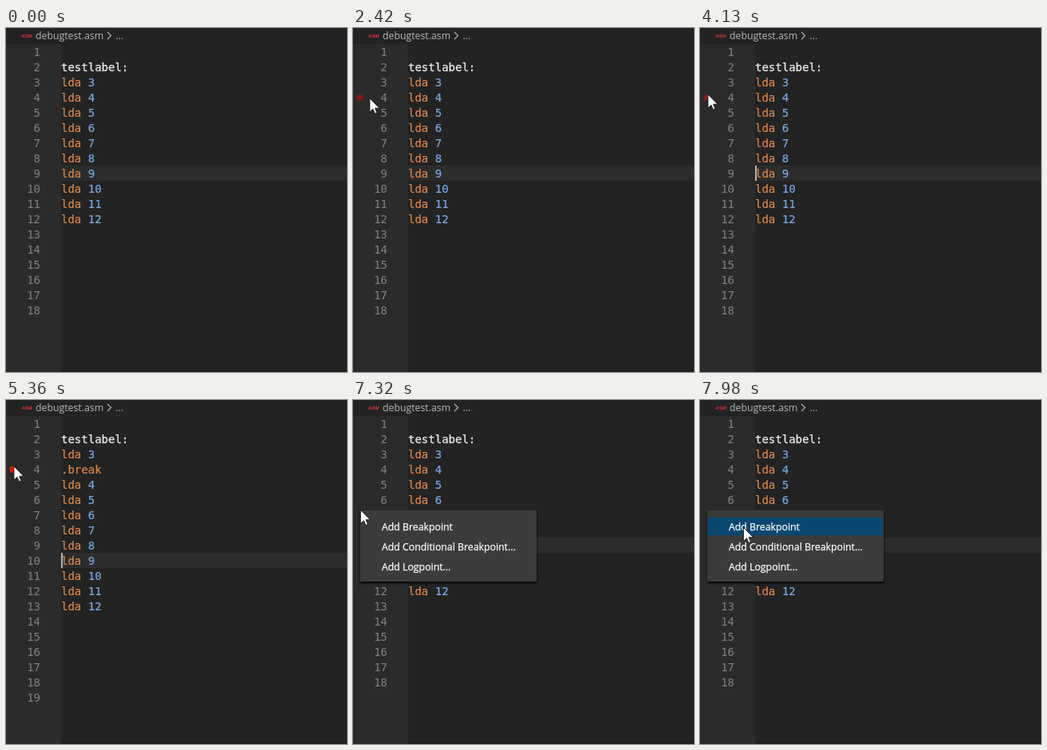
An HTML page that plays this animation: 427x430 px, repeating every 8 s.

```html
<!DOCTYPE html>
<html lang="en">
<head>
<meta charset="utf-8">
<title>Editor breakpoints</title>
<style>
  html, body { margin: 0; width: 100%; height: 100%; overflow: hidden; background: #232323; }
  svg { display: block; }
  text { white-space: pre; }
  .code { font: 14px "DejaVu Sans Mono", monospace; }
  .ui { font: 12.3px "Open Sans", sans-serif; }
  .path { fill: #b8b8b8; }
  .item { fill: #fff; stroke: #fff; stroke-width: .25; }
  .number { fill: #818181; text-anchor: end; }
  .label { fill: #ececec; stroke: #ececec; stroke-width: .25; }
  .op { fill: #db884a; stroke: #db884a; stroke-width: .2; }
  .value { fill: #78a7e2; stroke: #78a7e2; stroke-width: .2; }
</style>
</head>
<body>
<svg width="427" height="430" viewBox="0 0 427 430">
  <defs>
    <filter id="shadow" x="-10%" y="-15%" width="120%" height="135%">
      <feDropShadow dx="0" dy="2" stdDeviation="1.6" flood-color="#000"/>
    </filter>
  </defs>
  <rect width="427" height="430" fill="#232323"/>
  <rect y="20" width="69" height="410" fill="#2b2b2b"/>
  <rect x="69" y="427" width="358" height="3" fill="#1e1e1e"/>
  <rect id="activeLine" x="69" width="358" height="19" fill="#2c2c2c"/>

  <text x="19" y="11.5" fill="#d8343b" font-family="Liberation Sans, sans-serif" font-size="6.2" font-weight="700" font-style="italic">ASM</text>
  <text class="ui path" x="37" y="14">debugtest.asm</text>
  <path d="M127 5l4.5 4.5l-4.5 4.5" fill="none" stroke="#b8b8b8" stroke-width="1.1"/>
  <text class="ui path" x="137.5" y="14">...</text>

  <g id="plain" class="code"></g>
  <g id="marked" class="code"></g>
  <rect id="caret" x="69" width="2" height="19" fill="#b4b4b4"/>
  <circle id="dot" cx="8.5" r="4"/>

  <g id="menu">
    <rect x="9" y="138" width="221" height="89" fill="#3b3b3b" filter="url(#shadow)"/>
    <rect id="hover" x="10" y="147" width="219" height="22" fill="#094771"/>
    <g class="ui item">
      <text x="36" y="163">Add Breakpoint</text>
      <text x="36" y="188">Add Conditional Breakpoint...</text>
      <text x="36" y="213">Add Logpoint...</text>
    </g>
  </g>

  <path id="arrow" d="M0 0V17L4 13.3L6.5 19L9 18L6.6 12.2H12Z" fill="#fff" stroke="#111" stroke-width=".8"/>
  <g id="beam" fill="none">
    <path d="M-3.5 -7.5H3.5M0 -7.5V7.5M-3.5 7.5H3.5" stroke="#111" stroke-width="2.6"/>
    <path d="M-3.5 -7.5H3.5M0 -7.5V7.5M-3.5 7.5H3.5" stroke="#eee" stroke-width="1.2"/>
  </g>
</svg>
<script>
const LOOP = 8000, ROW = 19, TOP = 20, GUTTER = 69, BLINK = 495;
const HOVER_START = 1930, MENU_OPEN = 7320;
const el = id => document.getElementById(id);
const rowTop = row => TOP + ROW * (row - 1);
const rowAt = y => Math.floor((y - TOP) / ROW) + 1;
const show = (node, on) => { node.style.display = on ? '' : 'none'; };
const place = (node, p) => node.setAttribute('transform', `translate(${p.x} ${p.y})`);

const span = (type, text) => `<tspan class="${type}">${text}</tspan>`;
const program = ['', span('label', 'testlabel:')];
for (let n = 3; n <= 12; n++) program.push(span('op', 'lda ') + span('value', n));
const withBreak = program.slice();
withBreak.splice(3, 0, span('op', '.break'));

function listing(lines, count) {
  let out = '';
  for (let row = 1; row <= count; row++) {
    const y = rowTop(row) + 15;
    out += `<text class="number" x="43" y="${y}">${row}</text>`;
    if (lines[row - 1]) out += `<text x="${GUTTER}" y="${y}">${lines[row - 1]}</text>`;
  }
  return out;
}
el('plain').innerHTML = listing(program, 18);
el('marked').innerHTML = listing(withBreak, 19);

// Each click toggles the breakpoint and restarts the caret blink.
const clicks = [3180, 4130, 4870, 5480];

const moves = [
  { start: 930, end: 1690, steps: 13, from: [401, 341], to: [50, 109], ease: 1.42 },
  { start: 1750, end: 1930, steps: 3, from: [43, 104], to: [27, 92], ease: 1 },
  { start: 2420, end: 2720, steps: 4, from: [21, 88], to: [10, 83], ease: 1 },
  { start: 6230, end: 6590, steps: 6, from: [3, 90], to: [9.5, 137.5], ease: 1.65 },
  { start: 7810, end: 7980, steps: 3, from: [18, 141], to: [54.5, 159.5], ease: 1 }
];

function pointerAt(t) {
  const move = moves.filter(m => m.start <= t).pop();
  if (!move) return null;
  const { start, end, steps, from, to, ease } = move;
  const raw = Math.min(1, (t - start) / (end - start));
  const p = Math.floor(raw * steps + 0.05) / steps;
  const k = 1 - (1 - p) ** ease;
  const mix = i => Math.round(2 * (from[i] + (to[i] - from[i]) * k)) / 2;
  return { x: mix(0), y: mix(1) };
}

function render(t) {
  const done = clicks.filter(c => c <= t);
  const marked = done.length % 2 === 1;
  show(el('plain'), !marked);
  show(el('marked'), marked);

  const line = rowTop(marked ? 10 : 9);
  el('activeLine').setAttribute('y', line);
  el('caret').setAttribute('y', line);
  show(el('caret'), done.length && (t - done.pop()) % (2 * BLINK) < BLINK);

  // The dot follows the pointer's row, one step late.
  const hovering = t >= HOVER_START && t < MENU_OPEN;
  show(el('dot'), hovering);
  if (hovering) {
    el('dot').setAttribute('cy', rowTop(rowAt(pointerAt(t - 60).y)) + 10);
    el('dot').setAttribute('fill', marked ? '#e51400' : '#7d1f1d');
  }

  const pointer = pointerAt(t);
  const overCode = pointer && t < MENU_OPEN && pointer.x > GUTTER;
  show(el('beam'), overCode);
  show(el('arrow'), pointer && !overCode);
  if (pointer) place(el(overCode ? 'beam' : 'arrow'), pointer);

  show(el('menu'), t >= MENU_OPEN);
  show(el('hover'), pointer && pointer.x > 36);
}

const start = performance.now();
function tick() {
  render((performance.now() - start) % LOOP);
  requestAnimationFrame(tick);
}
tick();
</script>
</body>
</html>
```
